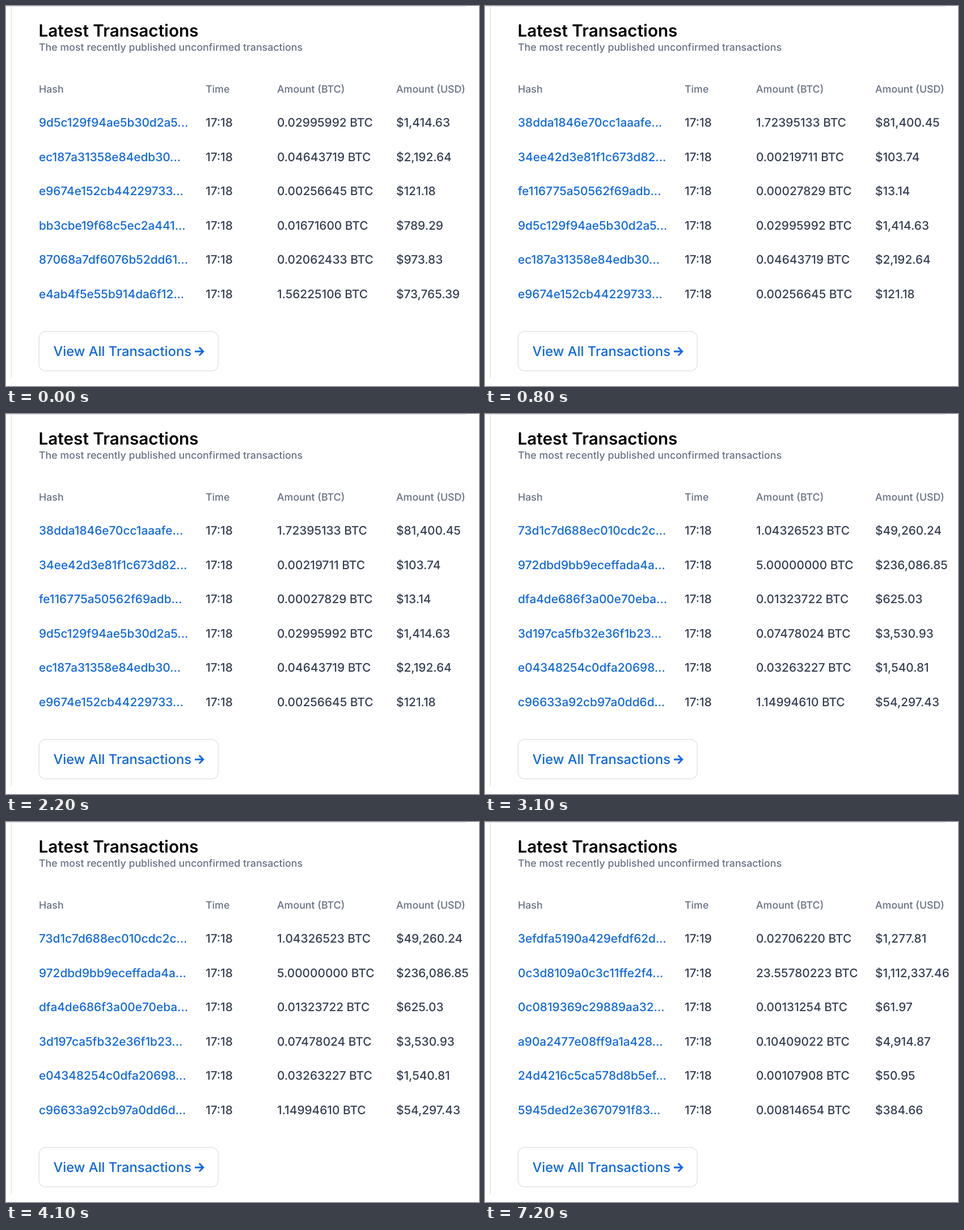
An HTML page that plays this animation: 834 px wide and 671 px high, repeating every 8 s.

```html
<!DOCTYPE html>
<html lang="en">
<head>
<meta charset="utf-8">
<title>Latest Transactions</title>
<style>
  html, body { margin: 0; width: 100%; height: 100%; overflow: hidden; background: #fff; }
  svg { display: block; width: 834px; height: 671px; }
  text { font: 500 20.8px Inter, sans-serif; font-optical-sizing: none; text-rendering: geometricPrecision; fill: #353f52; white-space: pre; }
  .title { font-size: 29.7px; font-weight: 600; fill: #000; }
  .muted { font-size: 17.8px; fill: #677184; }
  .link { fill: #1068e0; }
  .button { font-size: 23.7px; }
  .rule { fill: none; stroke: #dfe3eb; stroke-width: 1.5; }
  .arrow { fill: none; stroke: #1068e0; stroke-width: 2.8; }
</style>
</head>
<body>
<svg viewBox="0 0 834 671">
  <path class="rule" d="M0 .5H812M9.5 0V657"/>
  <text class="title" x="57.5" y="54">Latest Transactions</text>
  <text class="muted" x="58" y="78.5">The most recently published unconfirmed transactions</text>
  <g id="table"></g>
  <rect class="rule" x="58.2" y="574.7" width="316" height="69.6" rx="11.5"/>
  <text class="link button" x="83.5" y="618">View All Transactions</text>
  <path class="arrow" d="M333 610H347.5M340.7 602.8L347.8 610L340.7 617.2"/>
</svg>
<script>
const LOOP = 8000;
const COLUMNS = [58, 352, 478, 688];
const HEADS = ["Hash", "Time", "Amount (BTC)", "Amount (USD)"];

// hash, BTC, USD and an optional time
const parse = block => block.trim().split("\n").map(line => {
  const [hash, btc, usd, time = "17:18"] = line.trim().split(" ");
  return [hash + "...", time, btc + " BTC", "$" + usd];
});

const first = parse(`
  9d5c129f94ae5b30d2a5 0.02995992 1,414.63
  ec187a31358e84edb30 0.04643719 2,192.64
  e9674e152cb44229733 0.00256645 121.18
  bb3cbe19f68c5ec2a441 0.01671600 789.29
  87068a7df6076b52dd61 0.02062433 973.83
  e4ab4f5e55b914da6f12 1.56225106 73,765.39`);

const second = parse(`
  38dda1846e70cc1aaafe 1.72395133 81,400.45
  34ee42d3e81f1c673d82 0.00219711 103.74
  fe116775a50562f69adb 0.00027829 13.14`).concat(first.slice(0, 3));

const third = parse(`
  73d1c7d688ec010cdc2c 1.04326523 49,260.24
  972dbd9bb9eceffada4a 5.00000000 236,086.85
  dfa4de686f3a00e70eba 0.01323722 625.03
  3d197ca5fb32e36f1b23 0.07478024 3,530.93
  e04348254c0dfa20698 0.03263227 1,540.81
  c96633a92cb97a0dd6d 1.14994610 54,297.43`);

const fourth = parse(`
  3efdfa5190a429efdf62d 0.02706220 1,277.81 17:19
  0c3d8109a0c3c11ffe2f4 23.55780223 1,112,337.46
  0c0819369c29889aa32 0.00131254 61.97
  a90a2477e08ff9a1a428 0.10409022 4,914.87
  24d4216c5ca578d8b5ef 0.00107908 50.95
  5945ded2e3670791f83 0.00814654 384.66`);

const STATES = [[0, first], [800, second], [3100, third], [6500, fourth]];

const table = document.getElementById("table");
function addText(x, y, className, content = "") {
  const node = document.createElementNS(table.namespaceURI, "text");
  node.setAttribute("x", x);
  node.setAttribute("y", y);
  node.setAttribute("class", className);
  node.textContent = content;
  table.append(node);
  return node;
}

HEADS.forEach((head, c) => addText(COLUMNS[c], 153, "muted", head));
const cells = first.map((_, r) =>
  COLUMNS.map((x, c) => addText(x, 213 + r * 60.6, c ? "" : "link")));

let shown;
function draw(now) {
  const t = now % LOOP;
  const rows = STATES.findLast(([start]) => t >= start)[1];
  if (rows !== shown) {
    rows.forEach((row, r) => row.forEach((value, c) => { cells[r][c].textContent = value; }));
    shown = rows;
  }
  requestAnimationFrame(draw);
}
draw(performance.now());
</script>
</body>
</html>
```
